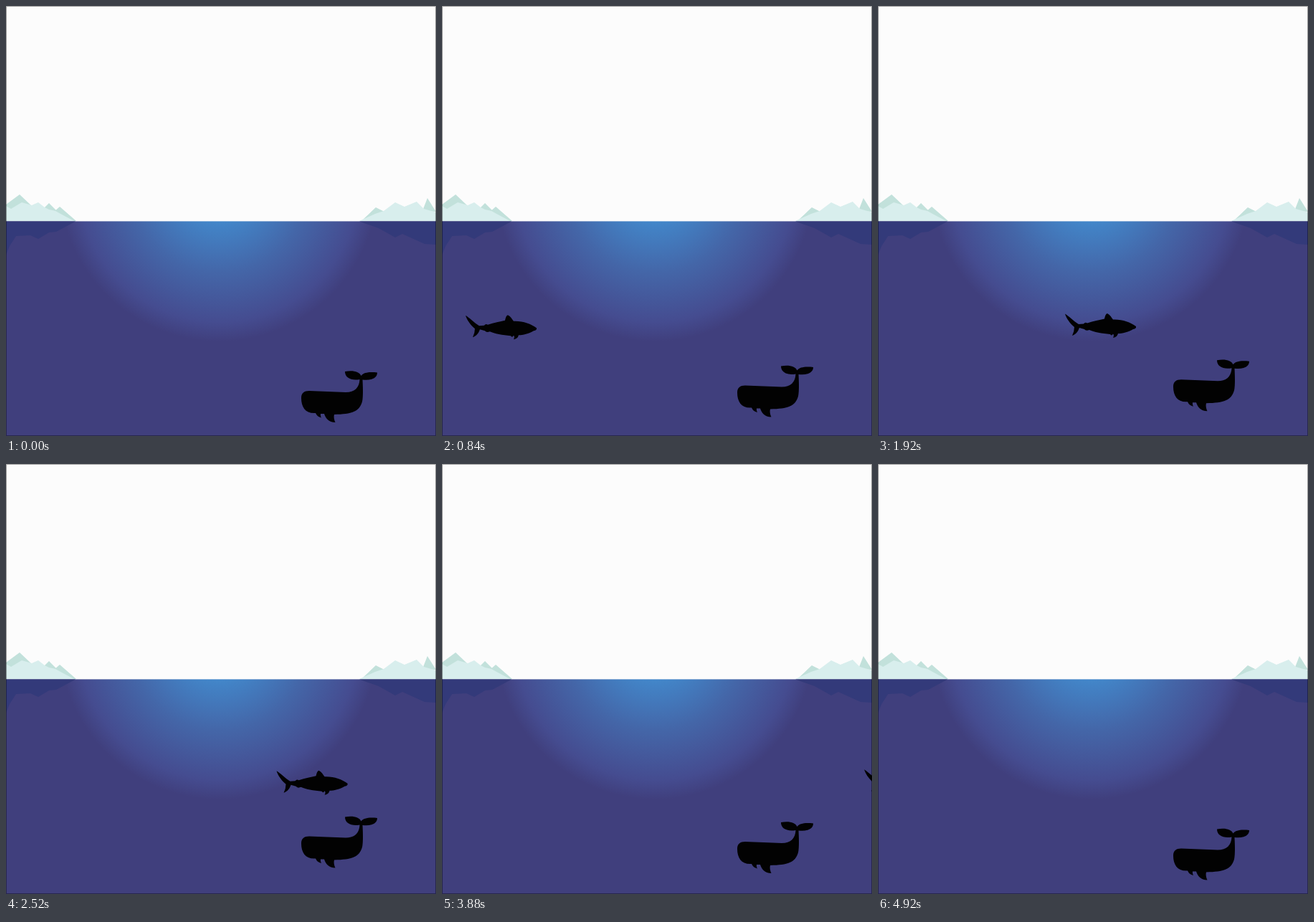
Recreate the animation shown at these times as an HTML page. Size 600 px wide and 600 px high, loop 4.96 s.

```html
<!DOCTYPE html>
<html lang="en">
<head>
<meta charset="utf-8">
<title>Ocean</title>
<style>
  html, body { margin: 0; width: 100%; height: 100%; overflow: hidden; background: #fcfcfc; }
  svg { display: block; width: 100%; height: 100%; }
</style>
</head>
<body>
<svg viewBox="0 0 600 600">
  <defs>
    <radialGradient id="glow" gradientUnits="userSpaceOnUse" cx="297" cy="245" r="223">
      <stop offset="0" stop-color="#4197dd"/>
      <stop offset=".25" stop-color="#4286c9"/>
      <stop offset=".57" stop-color="#4466a8"/>
      <stop offset=".88" stop-color="#454c90"/>
      <stop offset="1" stop-color="#403f7d"/>
    </radialGradient>
  </defs>
  <rect width="600" height="600" fill="#fcfcfc"/>

  <!-- icebergs -->
  <path fill="#c2e1db" d="M0 277L19 263L38 281L20 292L0 290Z M52 283L60 275L72 287Z M67 287L75 280L98 300H80Z
    M498 298L516 281L528 287Z M581 286L588 268L600 287Z"/>
  <path fill="#d8eeed" d="M0 279L7 283L22 274L36 278L45 274L54 281L60 284L69 286L78 291L95 300H0Z
    M493 300L515 290L527 286L543 274L556 280L573 273L583 283L600 288V300Z"/>

  <!-- water -->
  <rect y="300.4" width="600" height="300" fill="url(#glow)"/>
  <path fill="#333a7a" d="M0 300.4H97L85 307L70 315L60 316L45 325L34 320L14 321L5 335L0 347Z
    M493 300.4L520 310L543 323L553 318L584 332L600 333V300.4Z"/>

  <path id="shark" fill="#020202" d="M0 .5C6 4 12 11 19 15L26 14.5Q28 11.5 31 13.5C40 10.5 48 9 55 7.5
    C56 3 57 .5 59 0C63 2 65 6 67 8.5C80 8 91 12 99 18Q100 21 95 22C88 26 80 28 74 28Q73 33 67 34
    Q69 30 67 28.5Q65 32 63 29C52 28 40 26 34 23Q29 25 27 22L20 20C18 26 15 29 10 31Q13 25 13 19C7 14 2 7 0 .5Z"/>

  <path id="whale" fill="#020202" d="M412 547C412 540 416 537 423 537L474 539C487 539 493 532 493.500 521
    C482 523 473 519 473 510C484 508 493 510 495.500 516C499 511 508 510.500 518 511.500C518 520 508 523 497.500 521.500
    C498 531 498.500 545 497 552C493 566 483 569.500 458 570C457 574 458 578 459.500 581
    C450 581 446 575 444 569L439 569Q438.500 572 440 574.500Q434 573 432 568C418 569 412 560 412 547Z"/>

  <rect x=".5" y=".5" width="599" height="599" fill="none" stroke="#000" stroke-opacity=".38"/>
</svg>
<script>
  const LOOP = 4960, SPAN = 5000;
  const shark = document.getElementById('shark');
  const whale = document.getElementById('whale');

  // cubic-bezier(.167, .167, .667, 1): linear start, soft landing
  function ease(x) {
    let lo = 0, hi = 1;
    for (let i = 0; i < 24; i++) {
      const s = (lo + hi) / 2, r = 1 - s;
      if (s * r * r / 2 + 2 * s * s * r + s ** 3 < x) lo = s; else hi = s;
    }
    return x + lo * lo * (1 - lo);
  }

  const move = (el, x, y) => el.setAttribute('transform', `translate(${x} ${y})`);

  function draw(now) {
    const p = (now % LOOP) / SPAN;
    const swim = ease(p);
    move(shark, -136 + 800 * swim, 433 - 8 * swim);
    move(whale, 0, -17.5 * ease(2 * Math.min(p, 1 - p)));
  }

  const start = performance.now();
  function tick() {
    draw(performance.now() - start);
    requestAnimationFrame(tick);
  }
  tick();
</script>
</body>
</html>
```
